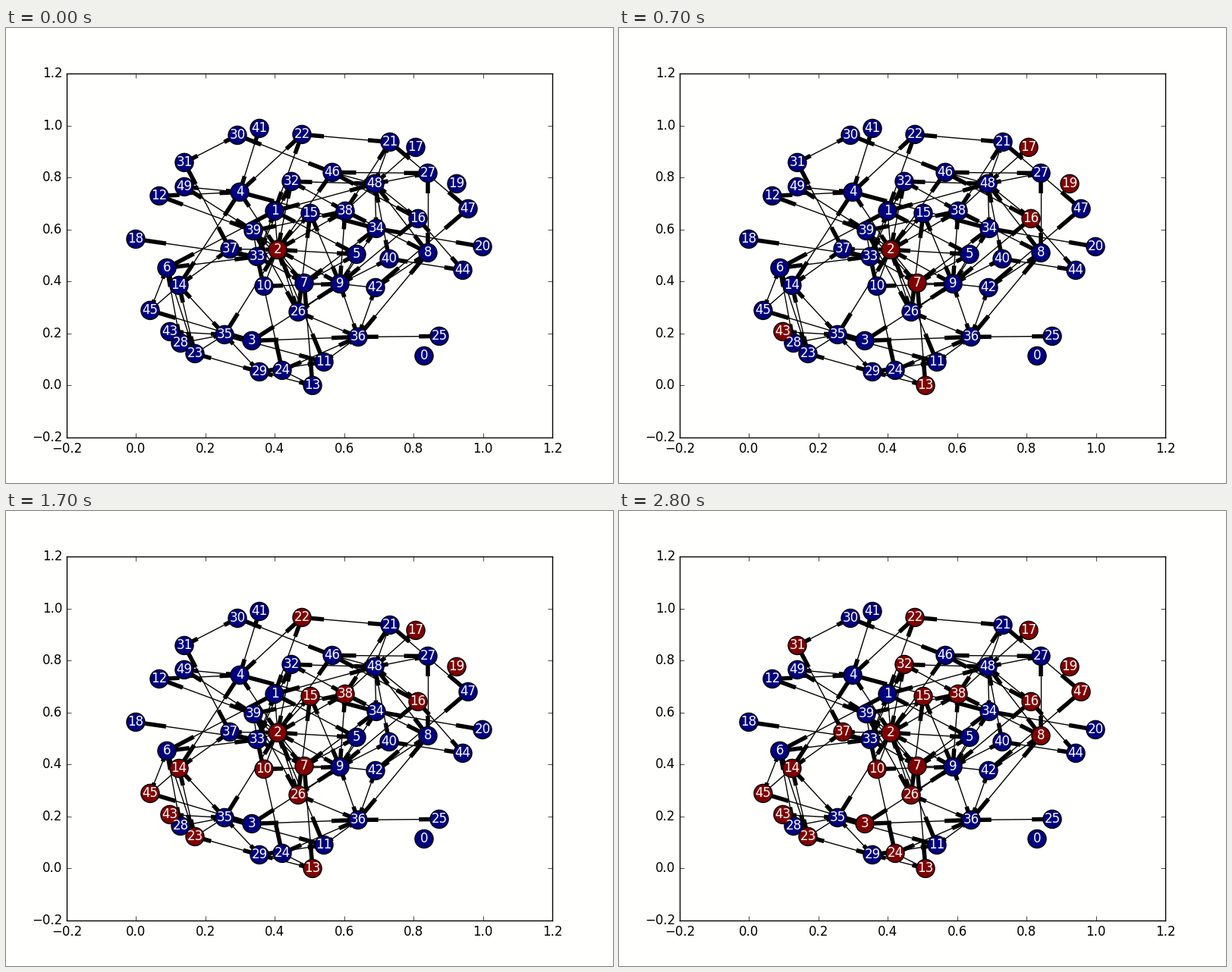
These frames come from a looping animation (800 by 600 pixels, 2.9 s). A matplotlib script:

```python
from itertools import pairwise

import matplotlib.pyplot as plt
import numpy as np
from matplotlib.animation import FuncAnimation
from matplotlib.collections import LineCollection

FRAMES, INTERVAL = 29, 100
HEALTHY, INFECTED = "#000080", "#800000"
PAPER = "#fffffd"

plt.rcParams.update({"font.family": "DejaVu Sans", "font.size": 12})

# Node centres in stage pixels, listed by node number
CENTRES = np.array([
    (551, 432), (354, 241), (358, 292), (324, 412), (308, 216),
    (462, 298), (212, 316), (393, 336), (556, 296), (440, 337),
    (340, 340), (419, 440), (202, 221), (404, 471), (228, 339),
    (401, 244), (543, 251), (540, 157), (171, 278), (594, 205),
    (628, 288), (506, 150), (390, 140), (249, 429), (364, 451),
    (571, 406), (385, 374), (556, 191), (230, 415), (334, 453),
    (305, 141), (235, 177), (376, 202), (331, 301), (488, 264),
    (288, 404), (464, 407), (295, 291), (447, 241), (326, 267),
    (505, 304), (334, 132), (487, 342), (216, 400), (602, 319),
    (190, 372), (430, 190), (609, 238), (486, 205), (235, 209),
]) + (0, 0.4)

# Hubs link to every node within their reach in pixels
HUBS = {2: 105, 9: 101, 33: 72, 35: 80, 36: 86, 48: 75}

# Long links, followed from node to node
TRAILS = [
    (41, 4, 22, 21, 47, 42, 8, 27, 46, 30, 31, 37, 14, 4, 12, 39, 49, 4, 34, 20),
    (45, 3, 36, 8, 38, 39, 7, 13, 29, 24, 33, 32, 48, 1, 22),
    (3, 9, 16, 46, 2, 35, 11, 2),
    (35, 14, 23, 6, 45, 14),
    (18, 33, 6, 28),
    (6, 1, 5, 7, 34),
    (16, 44, 40, 48, 8),
    (25, 36, 24, 13),
    (23, 29, 11),
    (39, 26, 15),
    (21, 38, 32),
]

# Nodes in the order in which they turn red
SPREAD = [2, 13, 43, 7, 17, 16, 19, 26, 10, 14, 22,
          45, 23, 15, 38, 3, 31, 37, 32, 24, 8, 47]


def to_data(pixels):
    """Convert stage pixels to axis units."""
    x, y = pixels.T
    return np.column_stack([(x - 80) / 640, (540 - y) / 480]) * 1.4 - 0.2


def find_links():
    links = {frozenset(pair) for trail in TRAILS for pair in pairwise(trail)}
    for hub, reach in HUBS.items():
        dist = np.hypot(*(CENTRES - CENTRES[hub]).T)
        links |= {frozenset((hub, int(n))) for n in np.flatnonzero(dist < reach)
                  if n != hub}
    return sorted(sorted(link) for link in links)


def infected_count(frame):
    """The spread slows down a little over the loop."""
    return 1 + int(0.965 * frame - 0.006 * frame ** 2)


def setup_axes(ax):
    ticks = [k / 5 for k in range(-1, 7)]
    names = [f"{t:.1f}".replace("-", "\u2212") for t in ticks]
    ax.set_xticks(ticks, names)
    ax.set_yticks(ticks, names, va="center")
    ax.set(xlim=(-0.2, 1.2), ylim=(-0.2, 1.2))
    ax.tick_params(direction="in", length=4, width=0.5, pad=4,
                   top=True, right=True)
    for spine in ax.spines.values():
        spine.set_linewidth(1)


def draw_links(ax, pos):
    lines = [(pos[a], pos[b]) for a, b in find_links()]
    # A thick quarter at each end marks the arrow heads
    stubs = [(start, start + (end - start) / 4)
             for p, q in lines for start, end in ((p, q), (q, p))]
    for segments, width in ((lines, 1), (stubs, 4)):
        ax.add_collection(LineCollection(segments, colors="k",
                                         linewidths=width, zorder=1))


fig = plt.figure(figsize=(8, 6), dpi=100, facecolor=PAPER)
ax = fig.add_axes([0.1, 0.1, 0.8, 0.8], facecolor=PAPER)
setup_axes(ax)

pos = to_data(CENTRES)
draw_links(ax, pos)
nodes = ax.scatter(*pos.T, s=300, c=HEALTHY, edgecolors="k",
                   linewidths=1, zorder=2)
for number, (x, y) in enumerate(pos):
    ax.text(x, y, str(number), color="w", ha="center", va="center", zorder=3)


def update(frame):
    infected = SPREAD[:infected_count(frame)]
    nodes.set_facecolors([INFECTED if n in infected else HEALTHY
                          for n in range(len(pos))])
    return (nodes,)


anim = FuncAnimation(fig, update, frames=FRAMES, interval=INTERVAL,
                     repeat=True, repeat_delay=0)
plt.show()
```
